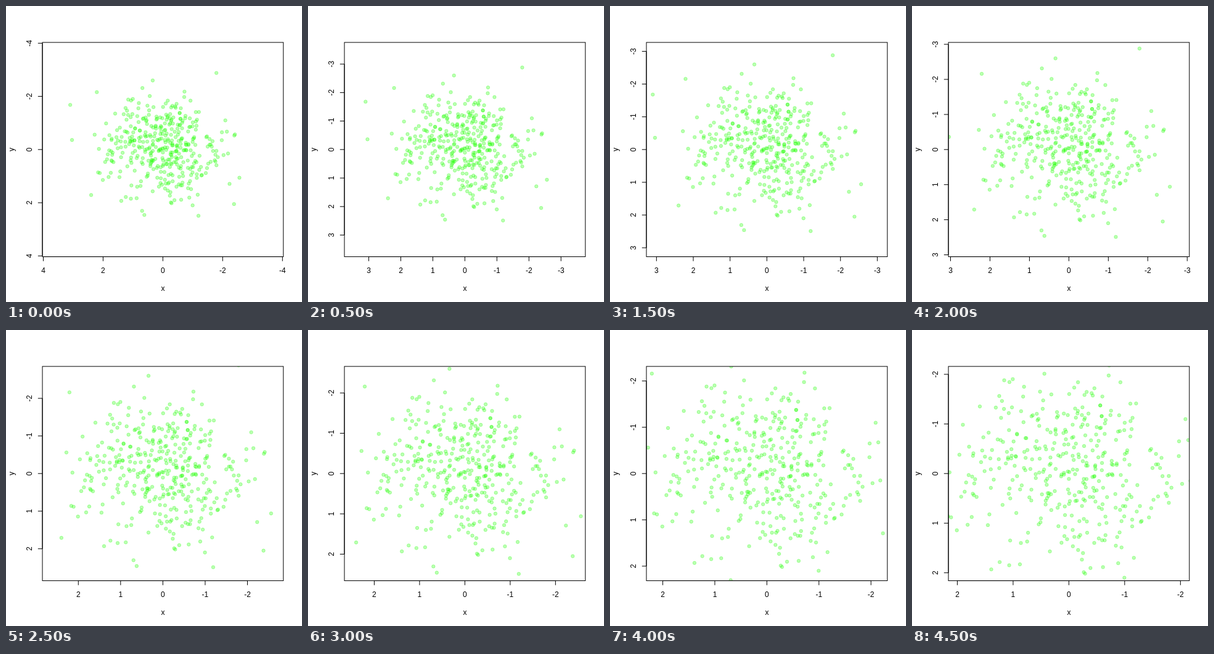
Animation, 480 px wide and 480 px high, one loop 5000 ms. Source, as an HTML page with a canvas:

```html
<!DOCTYPE html>
<html lang="en">
<head>
<meta charset="utf-8">
<title>Scatter plot zoom</title>
<style>
  html, body { margin: 0; width: 100%; height: 100%; overflow: hidden; background: #fff; }
  canvas { display: block; }
</style>
</head>
<body>
<canvas id="plot" width="480" height="480"></canvas>
<script>
const ctx = document.getElementById('plot').getContext('2d');
const STEP = 500, STEPS = 10;
const BOX = { left: 59.04, top: 59.04, width: 390.72, height: 347.52 };
const BOTTOM = BOX.top + BOX.height;
const CENTER = { x: BOX.left + BOX.width / 2, y: BOX.top + BOX.height / 2 };
const START_RANGE = 4.03;
const TICK = 7.2;
const DOT = 'rgba(30,255,0,0.3)';

// The few farthest points, in axis units.
const outliers = [
  [3.1, -1.68], [3.04, -.36], [2.21, -2.16], [2.4, 1.71], [.34, -2.6], [.62, 2.46],
  [-1.19, 2.49], [-2.38, 2.05], [-2.23, 1.29], [-2.56, 1.06], [-2.41, -.57], [-1.79, -2.88]
];

function seededRandom(seed) {
  return () => {
    seed = (seed + 0x6D2B79F5) | 0;
    let t = Math.imul(seed ^ (seed >>> 15), 1 | seed);
    t = (t + Math.imul(t ^ (t >>> 7), 61 | t)) ^ t;
    return ((t ^ (t >>> 14)) >>> 0) / 4294967296;
  };
}

// Two-dimensional normal cloud cut off at the given radius.
function normalCloud(count, cutoff) {
  const random = seededRandom(7);
  const share = 1 - Math.exp(-cutoff * cutoff / 2);
  return Array.from({ length: count }, () => {
    const radius = Math.sqrt(-2 * Math.log(1 - random() * share));
    const angle = random() * 2 * Math.PI;
    return [radius * Math.cos(angle), radius * Math.sin(angle)];
  });
}

const points = [...outliers, ...normalCloud(388, 2.45)];

function line(x1, y1, x2, y2) {
  ctx.beginPath();
  ctx.moveTo(x1, y1);
  ctx.lineTo(x2, y2);
  ctx.stroke();
}

function label(text, x, y, upright = false) {
  ctx.save();
  ctx.translate(x, y);
  if (upright) ctx.rotate(-Math.PI / 2);
  ctx.fillText(text, 0, 0);
  ctx.restore();
}

function drawPoints(toX, toY) {
  ctx.save();
  ctx.beginPath();
  ctx.rect(BOX.left, BOX.top, BOX.width, BOX.height);
  ctx.clip();
  ctx.fillStyle = ctx.strokeStyle = DOT;
  for (const [x, y] of points) {
    ctx.beginPath();
    ctx.arc(toX(x), toY(y), 2.7, 0, 2 * Math.PI);
    ctx.fill();
    ctx.stroke();
  }
  ctx.restore();
}

function drawAxes(range, toX, toY) {
  const unit = range > 3.89 ? 2 : 1;
  const last = Math.floor(range / unit) * unit;
  line(toX(-last), BOTTOM, toX(last), BOTTOM);
  line(BOX.left, toY(-last), BOX.left, toY(last));
  for (let v = -last; v <= last; v += unit) {
    const x = toX(v), y = toY(v);
    line(x, BOTTOM, x, BOTTOM + TICK);
    line(BOX.left, y, BOX.left - TICK, y);
    label(v, x, 432.96);
    label(v, 41.76, y, true);
  }
  ctx.strokeRect(BOX.left, BOX.top, BOX.width, BOX.height);
  label('x', CENTER.x, 461.76);
  label('y', 12.96, CENTER.y, true);
}

function draw(step) {
  const range = START_RANGE * 2 ** (-step / STEPS);
  // Both axes run reversed: x grows to the left, y grows downward.
  const toX = v => CENTER.x - v * BOX.width / 2 / range;
  const toY = v => CENTER.y + v * BOX.height / 2 / range;

  ctx.fillStyle = '#fff';
  ctx.fillRect(0, 0, 480, 480);
  drawPoints(toX, toY);
  ctx.fillStyle = ctx.strokeStyle = '#000';
  ctx.font = '12px "Liberation Sans", Arial, sans-serif';
  ctx.textAlign = 'center';
  drawAxes(range, toX, toY);
}

function tick() {
  draw(Math.floor(performance.now() / STEP) % STEPS);
  requestAnimationFrame(tick);
}
tick();
</script>
</body>
</html>
```
